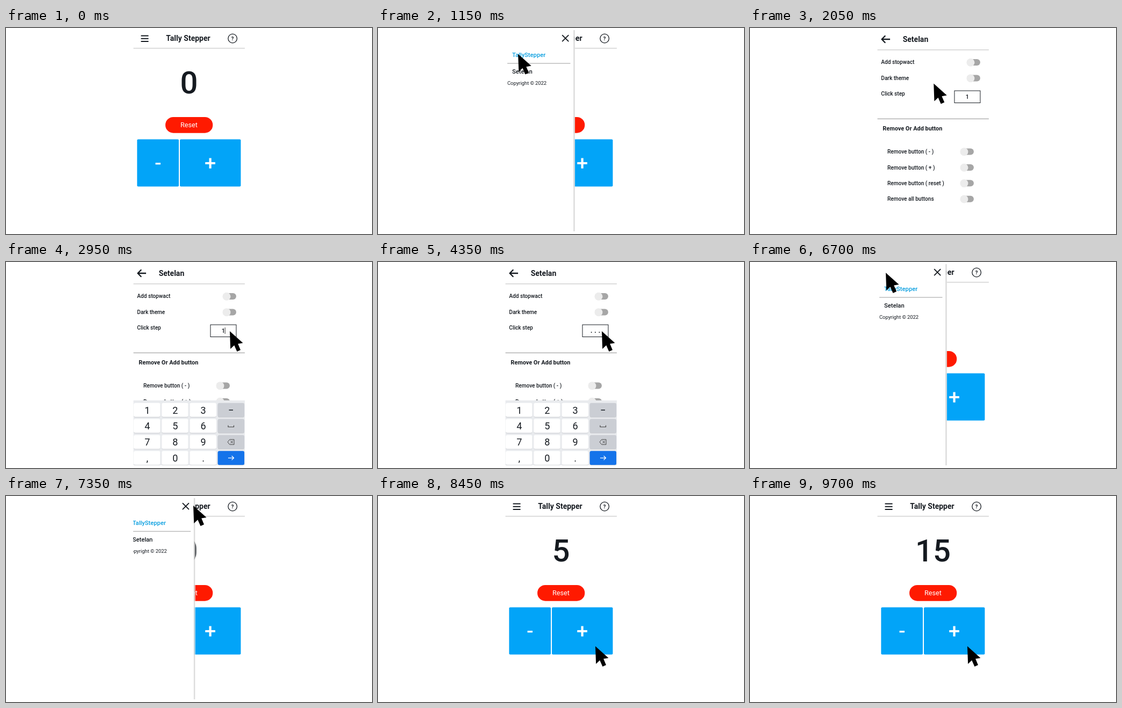
Recreate the animation shown at these times as an HTML page. Size 682 by 384 pixels, loop 10 s.

```html
<!DOCTYPE html>
<html lang="id">
<head>
<meta charset="utf-8">
<style>
html, body { margin: 0; width: 100%; height: 100%; overflow: hidden; background: #fff; }
svg { display: block; width: 682px; height: 384px; font-family: Roboto, sans-serif; fill: #151a20; }
.bold { font-weight: 700; }
.medium { font-weight: 500; }
.mid { text-anchor: middle; }
.line { fill: none; stroke: #151a20; }
</style>
</head>
<body>
<svg id="stage" viewBox="0 0 682 384"></svg>
<script>
const LOOP = 10000;
const APP = ['Tally', 'Stepper'];

const text = (x, y, size, str, cls = 'medium', extra = '') =>
  `<text x="${x}" y="${y}" font-size="${size}" class="${cls}" ${extra}>${str}</text>`;
const rect = (x, y, w, h, fill, r = 0) =>
  `<rect x="${x}" y="${y}" width="${w}" height="${h}" rx="${r}" fill="${fill}"/>`;
const stroke = (d, width, color = '#151a20') =>
  `<path class="line" d="${d}" stroke-width="${width}" style="stroke:${color}"/>`;
const headerLine = y => rect(237.5, y, 207.5, 1.2, '#cfcfcf') + rect(237.5, y + 1.2, 207.5, 1, '#ededed');
const toggle = (x, y) => rect(x, y - 6, 25, 12, '#a6a6a6', 6) +
  `<circle cx="${x + 7}" cy="${y + .3}" r="7.5" fill="#ececec"/>`;

const counterPage = `<g id="counterPage">
  ${stroke('M251.5 14.5h14M251.5 19.7h14M251.5 25h14', 2)}
  ${text(339.5, 24, 14, APP.join(' '), 'bold mid')}
  <circle class="line" cx="422.2" cy="19.5" r="8.3" stroke-width="1.3"/>
  ${text(422.2, 23, 9.5, '?', 'bold mid')}
  ${headerLine(37)}
  ${text(341, 122.3, 58, '0', 'medium mid', 'id="count"')}
  ${rect(297, 166, 88.3, 29.7, '#ff1a00', 14.8)}
  ${text(341, 185, 12.7, 'Reset', 'mid', 'fill="#fff"')}
  ${rect(244.3, 207.5, 77.7, 88, '#02a4f8', 2)}
  ${rect(324, 207.5, 113.5, 88, '#02a4f8', 2)}
  ${stroke('M278.5 252.8h9.5', 3.2, '#fff')}
  ${stroke('M371.3 252h18.6M380.6 242.4v19.4', 4.2, '#fff')}
  <g id="drawer">
    ${rect(230, 0, 135, 380, '#fff')}
    ${rect(364.6, 4, 1.2, 376, '#c2c2c2')}${rect(365.8, 4, 1.2, 376, '#ebebeb')}
    ${stroke('M343.2 13.2l12 12M355.2 13.2l-12 12', 1.9)}
    ${text(250, 53.6, 11.2, APP.join(''), 'medium', 'fill="#0a9fe0"')}
    ${rect(241, 65.4, 117.5, 1.1, '#a5a5a5')}
    ${text(250, 85.4, 11.2, 'Setelan')}
    ${text(241, 106, 9.4, 'Copyright © 2022', '')}
  </g></g>`;

const removeRows = ['( - )', '( + )', '( reset )'].map(s => 'Remove button ' + s).concat('Remove all buttons');

const settingsPage = `<g id="settingsPage">
  ${stroke('M261 21h-15M252.2 14.3L245.6 21l6.6 6.7', 2.3)}
  ${text(284.7, 26, 14, 'Setelan', 'bold')}
  ${headerLine(40)}
  ${['Add stopwact', 'Dark theme', 'Click step'].map((s, i) => text(244.3, 67.4 + i * 29.4, 10.1, s)).join('')}
  ${toggle(404, 64)}${toggle(404, 93.5)}
  <rect class="line" x="381" y="117" width="48" height="22.5"/>
  ${text(405, 132, 11, '1', 'medium mid', 'id="step"')}
  <g id="caret">${rect(407.7, 122, .9, 12, '#222')}</g>
  ${rect(237.5, 168.8, 207.5, 1.1, '#999')}
  ${text(247.3, 191.3, 10.95, 'Remove Or Add button', 'bold')}
  ${removeRows.map((s, i) => text(256, 234.2 + i * 29.4, 10.1, s) + toggle(392, 230.5 + i * 29.4)).join('')}
</g>`;

function keyboardMarkup() {
  let out = rect(237.5, 258, 207.5, 122, '#e9ebee');
  ['123', '456', '789', ',0.'].forEach((row, r) => {
    const y = 262.8 + r * 29.8;
    for (let c = 0; c < 4; c++) {
      const x = 238 + c * 52.2;
      const face = c < 3 ? '#fff' : r < 3 ? '#cbced4' : '#1473ea';
      out += rect(x, y + .9, 49.5, 26, '#c8cacf', 3) + rect(x, y, 49.5, 26, face, 3);
      if (c < 3) out += text(x + 25.2, y + 19.7, 18, row[c], 'mid');
    }
  });
  return out +
    stroke('M415.5 276h7.5', 1.3) +
    stroke('M414 304.5v3h10.5v-3', 1.2, '#444') +
    stroke('M413 335.6l3.8-4.7h8.2v9.4h-8.2zM418.5 333.2l4.4 4.8M422.9 333.2l-4.4 4.8', 1, '#444') +
    stroke('M414 365.3h10.5M420.6 361.5l3.9 3.8-3.9 3.8', 1.3, '#fff');
}

document.getElementById('stage').innerHTML = `
  <clipPath id="phone"><rect x="237" y="0" width="208.3" height="379"/></clipPath>
  <clipPath id="view"><rect id="viewRect" x="237" y="0" width="208.3" height="379"/></clipPath>
  <g clip-path="url(#view)">${counterPage}${settingsPage}</g>
  <g clip-path="url(#phone)"><g id="keyboard">${keyboardMarkup()}</g></g>
  <path id="cursor" fill="#000" d="M0 0L24.5 22 15.2 23.6 20 35 13.5 38 8.3 26.2 1.2 33z"/>`;

const el = id => document.getElementById(id);
const show = (id, on) => el(id).setAttribute('display', on ? 'inline' : 'none');
const move = (id, x, y) => el(id).setAttribute('transform', `translate(${x} ${y})`);
const progress = (t, start, end) => Math.min(1, Math.max(0, (t - start) / (end - start)));
const ease = p => p < .5 ? 4 * p ** 3 : 1 - 4 * (1 - p) ** 3;

// Cursor moves: start, end, destination x, y
const moves = [
  [50, 550, 258, 19],
  [1000, 1300, 264, 77],
  [1920, 2180, 417, 129],
  [6300, 6600, 253, 20],
  [6850, 7150, 349, 18],
  [7560, 7960, 405, 280]
];
const clicks = [8400, 8950, 9400];

function cursorAt(t) {
  let x = 340, y = 384;
  for (const [start, end, toX, toY] of moves) {
    const p = ease(progress(t, start, end));
    x += (toX - x) * p;
    y += (toY - y) * p;
  }
  return [x, y];
}

function draw(t) {
  const inSettings = t >= 1450 && t < 6700;
  show('settingsPage', inSettings);
  show('counterPage', !inSettings);

  const open = ease(progress(t, 600, 900)) - ease(progress(t, 7260, 7560));
  move('drawer', (open - 1) * 128, 0);
  show('drawer', open > 0);
  el('count').textContent = 5 * clicks.filter(c => t >= c).length;

  const rise = progress(t, 2450, 2750), fall = progress(t, 5960, 6260);
  const typing = rise > 0 && fall < 1;
  show('keyboard', typing);
  move('keyboard', 0, 121 * (1 - ease(rise) + ease(fall)));
  el('keyboard').setAttribute('opacity', Math.max(0, rise - 1.5 * fall));
  el('viewRect').setAttribute('height', rise === 1 && typing ? 258 : 379);

  const empty = t >= 3450 && t < 4700;
  el('step').textContent = empty ? '. . .' : t < 3450 ? '1' : '5';
  el('step').setAttribute('font-size', empty ? 14 : 11);
  show('caret', typing && !(t >= 4350 && t < 4700) && !(t >= 5250 && t < 5700));

  show('cursor', t >= 50);
  move('cursor', ...cursorAt(t));
}

function tick() {
  draw(performance.now() % LOOP);
  requestAnimationFrame(tick);
}
tick();
</script>
</body>
</html>
```
